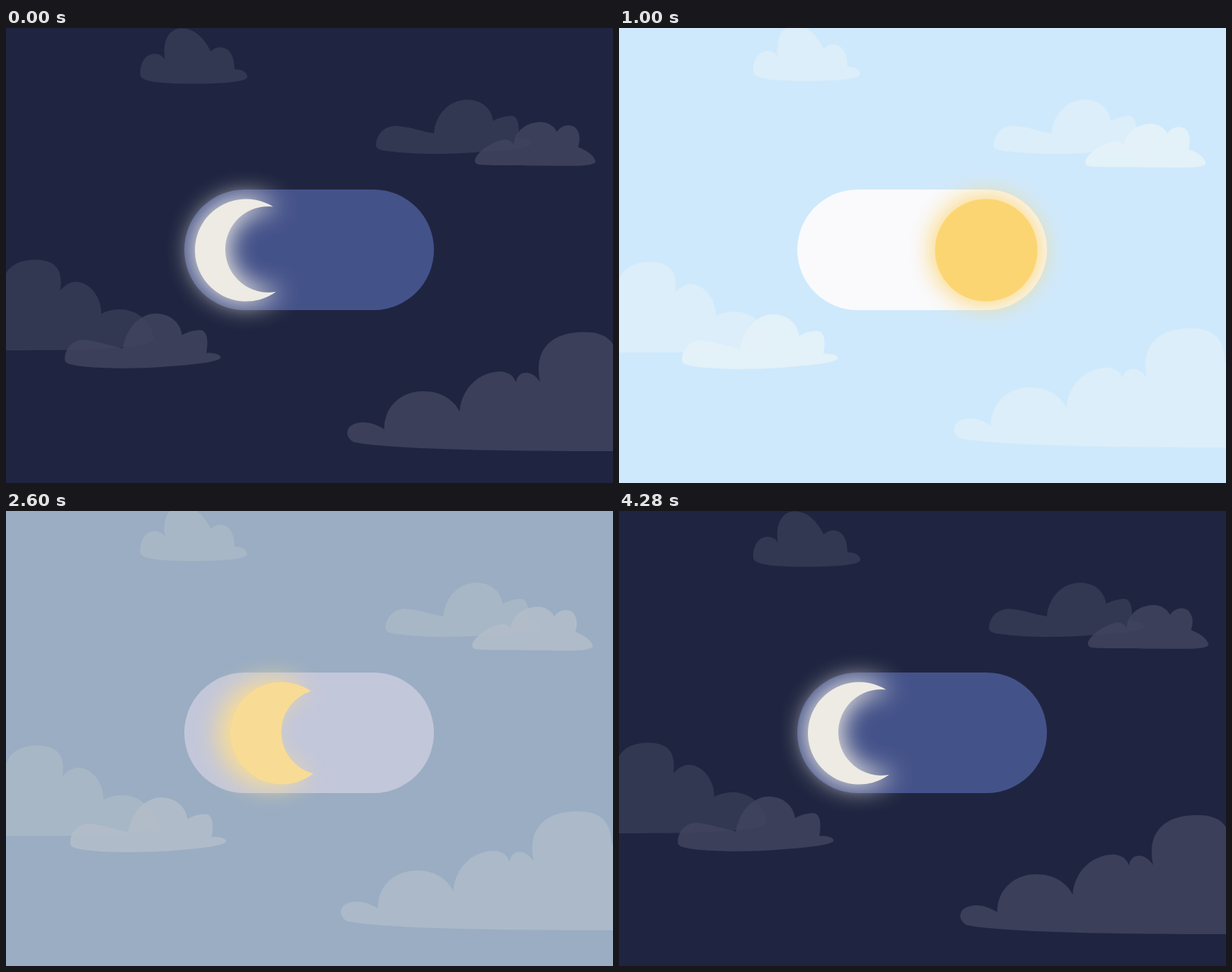
An HTML page for the animation above (4480 ms loop, 800 px wide and 600 px high).

```html
<!DOCTYPE html>
<html lang="en">
<head>
<meta charset="utf-8">
<title>Day and night switch</title>
<style>
  html, body { margin: 0; width: 100%; height: 100%; overflow: hidden; }
  svg { display: block; width: 100vw; height: 100vh; }
</style>
</head>
<body>
<svg id="stage" viewBox="0 0 800 600">
  <defs>
    <filter id="blur" filterUnits="userSpaceOnUse" x="-150" y="-150" width="300" height="300" color-interpolation-filters="sRGB">
      <feGaussianBlur stdDeviation="16"/>
    </filter>
  </defs>
  <rect id="sky" width="800" height="600"/>
  <g id="clouds" fill-opacity=".85"></g>
  <rect id="track" x="235" y="213" width="329" height="159" rx="79.5"/>
  <path id="glow" filter="url(#blur)" stroke-width="8" stroke-linejoin="round"/>
  <path id="disc"/>
</svg>
<script>
const LOOP = 4480;
const R = 67.5;
const GLOW_LEAD = 40;
const $ = id => document.getElementById(id);

// Each colour as [night, day].
const COLORS = {
  sky: [[31, 37, 64], [210, 236, 255]],
  track: [[68, 82, 138], [253, 253, 255]],
  knob: [[238, 235, 228], [252, 213, 113]],
  far: [[55, 61, 85], [225, 242, 252]],
  near: [[64, 69, 95], [234, 245, 253]],
  front: [[64, 69, 95], [225, 242, 252]]
};

// Drift of every cloud: share of its full shift at these times.
const TIMES = [0, 520, 800, 1840, 2600, 3160, 4280, LOOP];
const DRIFT = {
  early: [0, .36, .52, 1, .65, .39, 0, 0],
  middle: [0, .27, .45, 1, .75, .45, 0, 0],
  late: [0, .22, .38, .9, 1, .63, 0, 0]
};

const CLOUDS = [
  { drift: 'late', shift: [0, -7.5], tone: 'far',
    d: 'M177 62C176 48 183 34 196 34C203 34 207 38 209.5 41.5C206 22 212 1 231 .5C250 0 262 16 270 31C277 24 284 25 289 27C298 31 301 42 301 54.5C310 54 318 58 318 64.5C318 71 285 73.5 248 73.5C210 73.5 178 72 177 62Z' },
  { drift: 'late', shift: [12.5, 0], tone: 'far',
    d: 'M487.5 154C489 138 500 129 514 129C532 130 550 137 564 139C566 114 584 94.5 608 94.5C628 95 640 107 642 122.5C650 118 660 115.5 668 116C676 119 677 132 675 145C684 145 693 148 693 152C690 160 650 162 630 163C590 167 540 167 510 163C496 162 487 160 487.5 154Z' },
  { drift: 'early', shift: [-5.5, 3.5], tone: 'near',
    d: 'M618 174C621 163 640 150 657 147C663 147 667 150 669 154C670 136 686 124.5 704 124C715 124 723 130 726 137C733 127 745 126 751 132C758 140 756 150 754 157C766 162 775 168 777 176C776 183 745 182 700 181.5C660 181 625 182 620 179C618 177 618 176 618 174Z' },
  { drift: 'middle', shift: [4, 5], tone: 'far',
    d: 'M-60 425C-60 370 -30 352 -3 352C-8 325 5 306 38 305.5C62 306 76 315 71.5 346C80 337 86 335 92 334.5C112 336 126 356 125.5 377C134 372 144 371 152 371C172 372 190 386 195 408C194 420 160 421 140 422C110 425 50 425 -60 425Z' },
  { drift: 'middle', shift: [9.5, 1.7], tone: 'near',
    d: 'M77.5 436C78 422 88 411 103 411C120 413 138 419 154 422.5C158 398 174 377 198 376.5C217 377 230 389 232 405C240 400 250 398 258 398.5C267 402 266 417 264 428.5C273 428 283 430 283 434.5C282 441 235 445 205 447C165 450 110 449 90 444.5C80 443 77 440 77.5 436Z' },
  { drift: 'early', shift: [-13, -7.7], tone: 'front',
    d: 'M450 533C450 525 460 520 470 520C482 520 492 525 498.5 529C498 500 520 479 550 479C573 479 590 490 598 506C600 475 624 453 652 453C664 454 670 460 672 467.5C674 456 682 454 687 454.5C695 456 700 461 704 467C696 430 712 401 762 401C790 401 806 412 807 445C830 436 860 440 870 480V558H790C650 558 500 555 458 546C453 543 449 538 450 533Z' }
];

for (const c of CLOUDS) {
  c.el = document.createElementNS('http://www.w3.org/2000/svg', 'path');
  c.el.setAttribute('d', c.d);
  $('clouds').append(c.el);
}

const mix = (a, b, k) => a + (b - a) * k;
const color = (name, k) => {
  const [night, day] = COLORS[name];
  return `rgb(${night.map((v, i) => Math.round(mix(v, day[i], k)))})`;
};
const ease = (t, start, length) => {
  const u = Math.min(1, Math.max(0, (t - start) / length));
  return (1 - Math.cos(Math.PI * u)) / 2;
};
const daylight = t => ease(t, 285, 780) - ease(t, 2305, 780);
const travel = t => ease(t, 185, 700) - ease(t, 2150, 700);

// Smooth curve through the drift values, flat at its extremes.
function drift(values, t) {
  const rate = i => (values[i + 1] - values[i]) / (TIMES[i + 1] - TIMES[i]);
  const slope = i => {
    if (i === 0 || i === TIMES.length - 1) return i ? 0 : rate(0);
    const a = rate(i - 1), b = rate(i);
    return a * b <= 0 ? 0 : 2 * a * b / (a + b);
  };
  let i = 0;
  while (i < TIMES.length - 2 && t >= TIMES[i + 1]) i++;
  const span = TIMES[i + 1] - TIMES[i];
  const u = (t - TIMES[i]) / span, v = 1 - u;
  return v * v * (1 + 2 * u) * values[i] + u * u * (3 - 2 * u) * values[i + 1]
    + span * u * v * (v * slope(i) - u * slope(i + 1));
}

// Disc whose right side bends from a crescent (k = 0) to a full circle (k = 1).
function moonPath(k) {
  const ax = mix(35.5, 46, k), bx = mix(39.5, 46, k);
  const ay = -Math.sqrt(R * R - ax * ax), by = Math.sqrt(R * R - bx * bx);
  const half = Math.hypot(bx - ax, by - ay) / 2;
  const sag = (ax + bx) / 2 - mix(-27.5, R, k);
  const depth = Math.max(Math.abs(sag), .01);
  const r = (half * half + depth * depth) / (2 * depth);
  const large = depth > half ? 1 : 0;
  const sweep = sag > 0 ? 1 : 0;
  return `M${ax} ${ay}A${R} ${R} 0 1 0 ${bx} ${by}A${r} ${r} 0 ${large} ${sweep} ${ax} ${ay}Z`;
}

function placeMoon(el, pos, tint) {
  el.setAttribute('d', moonPath(pos));
  el.setAttribute('transform', `translate(${mix(316.5, 484, pos)} 293)`);
  el.setAttribute('fill', tint);
}

function draw(t) {
  const day = daylight(t);
  $('sky').setAttribute('fill', color('sky', day));
  $('track').setAttribute('fill', color('track', day));

  for (const c of CLOUDS) {
    const k = drift(DRIFT[c.drift], t);
    c.el.setAttribute('transform', `translate(${c.shift[0] * k} ${c.shift[1] * k})`);
    c.el.setAttribute('fill', color(c.tone, day));
  }

  // The glow runs slightly ahead of the disc.
  const tint = color('knob', day);
  placeMoon($('glow'), travel(t + GLOW_LEAD), tint);
  $('glow').setAttribute('stroke', tint);
  placeMoon($('disc'), travel(t), tint);
}

const start = performance.now();
function tick() {
  draw((performance.now() - start) % LOOP);
  requestAnimationFrame(tick);
}
tick();
</script>
</body>
</html>
```
